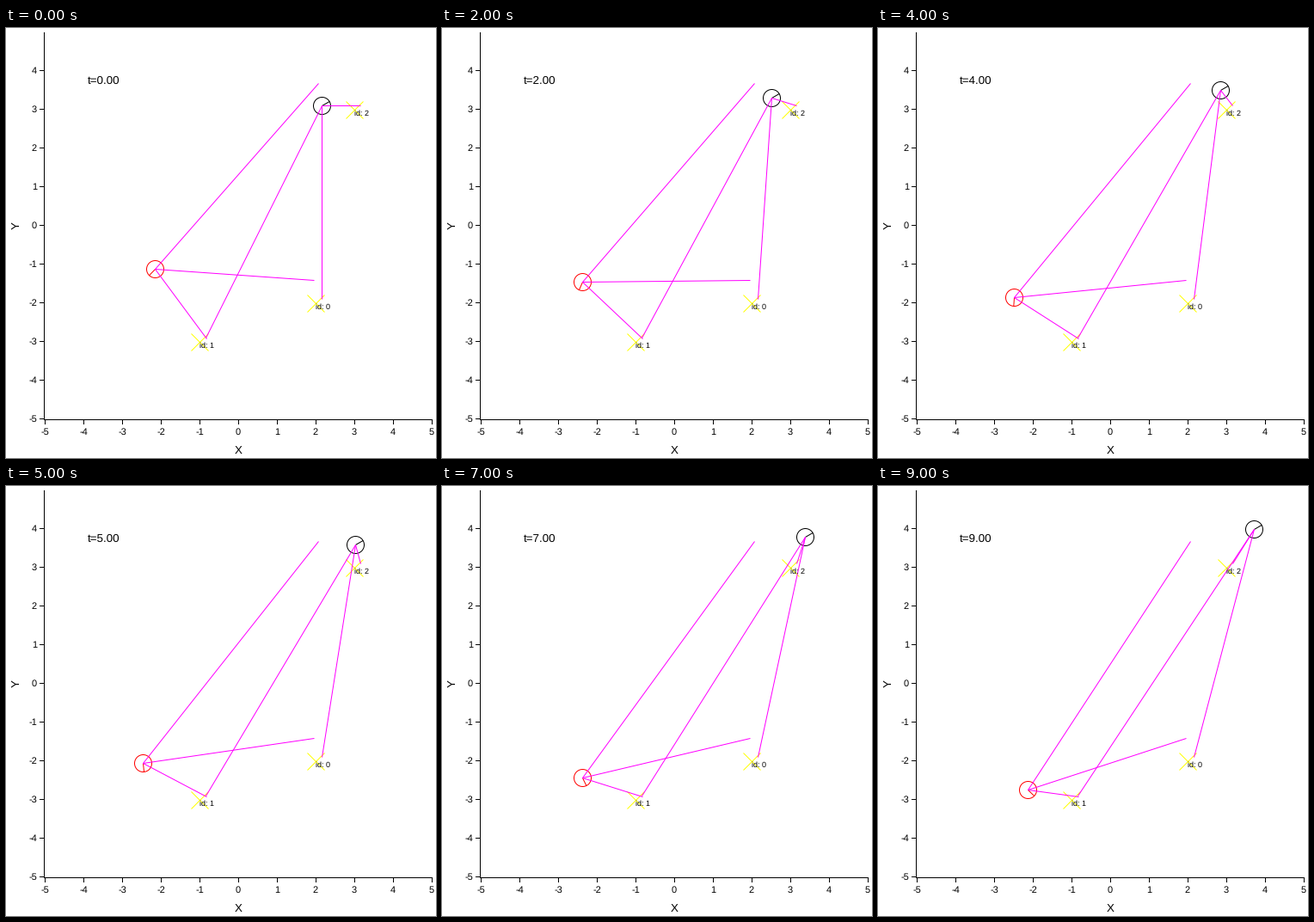
Animation, 500 px wide and 500 px high, one loop 10 s. Source, as a matplotlib script:

```python
import math
import matplotlib.pyplot as plt
from matplotlib.animation import FuncAnimation
from matplotlib.patches import Circle

SIZE, DPI, FRAMES = 500, 100, 10
PX = 72 / DPI          # points per pixel
UNIT = 45              # pixels per world unit
SPEED = 0.2            # world units per second
RADIUS = 10
LANDMARKS = [(2, -2), (-1, -3), (3, 3)]

plt.rcParams["font.family"] = "Liberation Sans"
plt.rcParams["text.hinting"] = "none"
fig = plt.figure(figsize=(SIZE / DPI, SIZE / DPI), dpi=DPI, facecolor="white")
ax = fig.add_axes([0, 0, 1, 1])
ax.set_xlim(0, SIZE)
ax.set_ylim(SIZE, 0)
ax.axis("off")


def line(x0, y0, x1, y1, color="black", z=2):
    return ax.plot([x0, x1], [y0, y1], color=color, lw=PX, zorder=z,
                   solid_capstyle="butt", snap=False)[0]


def label(x, y, s, size, ha="left", va="baseline", **kw):
    return ax.text(x, y, s, fontsize=size * PX, ha=ha, va=va, color="black",
                   zorder=6, **kw)


def to_px(x, y):
    """Centre of the pixel that holds a world point."""
    return (math.floor(270 + UNIT * x + 1e-6) + 0.5,
            math.floor(230 - UNIT * y + 1e-6) + 0.5)


def draw_axes():
    line(44.5, 5, 44.5, 456)
    line(44, 455.5, 496, 455.5)
    for v in range(-5, 6):
        x = 270.5 + UNIT * v
        line(x, 455, x, 461)
        label(x - 0.5, 473, str(v), 11, "center")
        if v < 5:
            y = 229.5 - UNIT * v
            line(39, y, 45, y)
            label(36, y + 3.5, str(v), 11, "right")
    label(270, 495, "X", 13.33, "center")
    label(12, 230, "Y", 13.33, "center", "center", rotation=90)


def draw_landmarks():
    for i, (wx, wy) in enumerate(LANDMARKS):
        x, y = to_px(wx, wy)
        for s in (RADIUS, -RADIUS):
            line(x - RADIUS, y - s, x + RADIUS, y + s, "#ffff00", 3)
        label(x - 0.5, y + 6.5, f"id: {i}", 9)


class Robot:
    """Drives along an arc; its rays end where the landmarks were first
    sensed, carried along by the first step."""

    def __init__(self, x, y, heading, turn, color):
        self.start, self.heading = (x, y), heading
        self.turn = math.radians(turn)
        self.body = ax.add_patch(Circle((0, 0), RADIUS, fill=False, lw=PX,
                                        ec=color, zorder=4))
        self.nose = line(0, 0, 0, 0, color, 4)
        self.ends = [self.carried(*p) for p in LANDMARKS]
        self.rays = [line(0, 0, 0, 0, "#ff00ff", 5) for _ in LANDMARKS]

    def pose(self, steps):
        x, y = self.start
        a = math.radians(self.heading)
        half = self.turn / 2
        chord = SPEED * (math.sin(half) / half if half else 1)
        for _ in range(steps):
            x += chord * math.cos(a + half)
            y += chord * math.sin(a + half)
            a += self.turn
        return x, y, a

    def carried(self, px, py):
        x, y, _ = self.pose(1)
        dx, dy = px - self.start[0], py - self.start[1]
        c, s = math.cos(self.turn), math.sin(self.turn)
        return to_px(x + c * dx - s * dy, y + s * dx + c * dy)

    def place(self, t):
        wx, wy, a = self.pose(t + 1)
        x, y = to_px(wx, wy)
        self.body.center = x, y
        self.nose.set_data([x, x + RADIUS * math.cos(a)],
                           [y, y - RADIUS * math.sin(a)])
        for ray, (ex, ey) in zip(self.rays, self.ends):
            ray.set_data([x, ex], [y, ey])


draw_axes()
draw_landmarks()
clock = label(95, 65, "", 13.33)
robots = [Robot(2, 3, 30, 0, "black"), Robot(-2, -1, 216, 10, "red")]


def update(t):
    clock.set_text(f"t={t:.2f}")
    for r in robots:
        r.place(t)
    return []


anim = FuncAnimation(fig, update, frames=FRAMES, interval=1000,
                     repeat=True, repeat_delay=0, blit=False)
plt.show()
```
